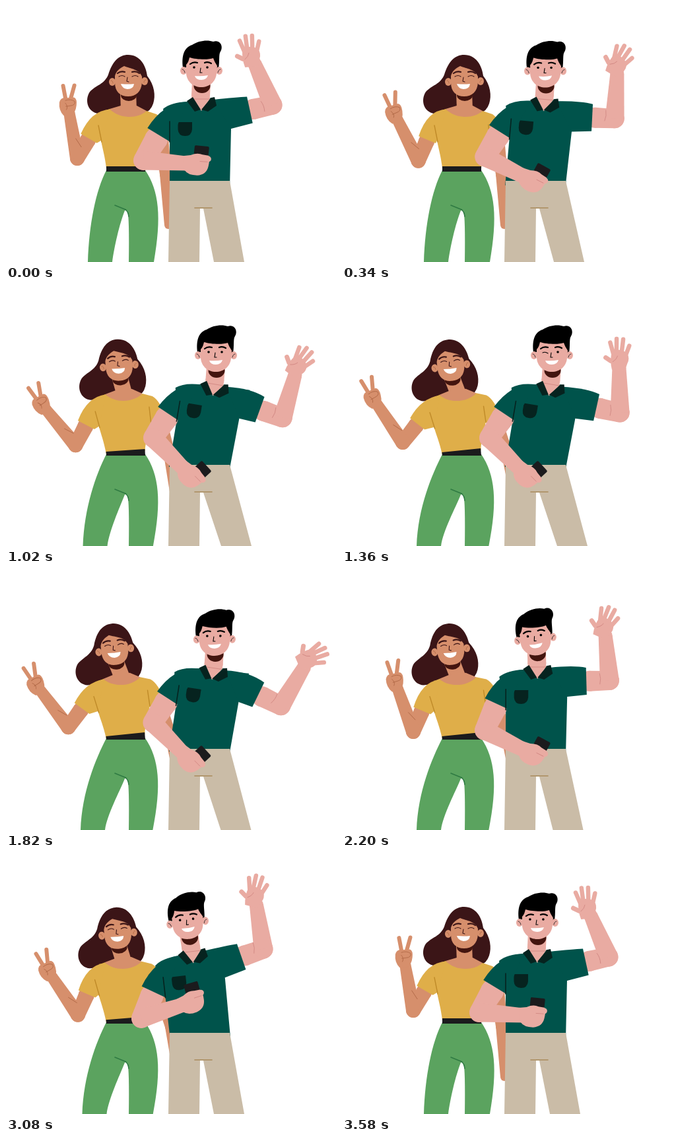
An HTML page with a canvas that plays this animation: 500 by 388 pixels, repeating every 3.6 s.

```html
<!DOCTYPE html>
<html lang="en">
<head>
<meta charset="utf-8">
<title>Waving couple</title>
<style>
html, body { margin: 0; width: 100%; height: 100%; overflow: hidden; background: #fff; }
canvas { display: block; }
</style>
</head>
<body>
<canvas id="stage" width="500" height="388"></canvas>
<script>
const ctx = document.getElementById('stage').getContext('2d');
const LOOP = 3600;

const C = {
  tan: '#d68f6c', tanLine: '#b26a48', brown: '#3b1517', yellow: '#dfae49', ochre: '#bf8a28',
  black: '#1b1b1d', leaf: '#5ba35f', leafLine: '#2f7a43',
  pink: '#e9aba2', pinkLine: '#cf8580', green: '#00534b', deep: '#06231f',
  sand: '#cabca7', sandLine: '#a98a5c', shade: '#43150f'
};

// Smooth step from 0 to 1 between two moments.
function ease(t, from, to) {
  const u = Math.min(1, Math.max(0, (t - from) / (to - from)));
  return u * u * (3 - 2 * u);
}

// Rises during one span, falls back during another.
const pulse = (t, a, b, c, d) => ease(t, a, b) - ease(t, c, d);

// Pendulum between turning points [time, angle], ending where it began.
function swing(t, ...turns) {
  const [[, first]] = turns;
  return [...turns, [LOOP, first]].reduce((sum, [time, angle], i, all) =>
    i ? sum + (angle - all[i - 1][1]) * ease(t, all[i - 1][0], time) : angle, 0);
}

// Angles are in degrees; a forearm at 0 points straight up.
function womanPose(t) {
  const sway = pulse(t, 400, 1400, 2850, 3600);
  const sag = pulse(t, 0, 700, 700, 1360) + pulse(t, 1700, 2200, 2900, 3600);
  const arm = swing(t, [0, -10], [700, -45], [1360, -34], [1680, -41], [2200, -20], [2820, -43]);
  return {
    head: [185 - 21 * sway, 112 + sway],
    lean: -6 * sway,
    leg: -11 * sway,
    elbow: [108 + 16 * (sag - sway), 231 + 8 * sag],
    arm, hand: 10 + 0.85 * arm
  };
}

function manPose(t) {
  const out = pulse(t, 0, 640, 1700, 2600);
  const back = pulse(t, 1700, 2600, 3080, 3600);
  const armOut = pulse(t, 0, 640, 1800, 2650);
  const lift = pulse(t, 2300, 3080, 3080, 3600);
  const arm = swing(t, [0, -23.5], [700, 32], [1360, -1], [1760, 32], [2580, -35], [3080, -9]);
  return {
    head: [296 + 22 * out - 21 * back, 97 + out],
    tilt: -6 * Math.min(1, 1.7 * back),
    lean: 9.5 * out - 6.5 * back,
    leg: 11 * out,
    elbow: [404 + armOut * (17 - 0.12 * arm) - 14 * back,
            150 + armOut * (36.5 + 0.45 * arm) - 12 * back],
    arm,
    hand: swing(t, [0, -6], [700, 70], [1360, 2], [1760, 68], [2580, -12], [3080, 14]),
    phoneElbow: [208 + 15 * out + 3 * back - 6 * lift, 234 - 10 * out + 12 * back - 3 * lift],
    phoneArm: 94 + 41.5 * armOut - 22 * lift,
    winking: t > 1160 && t < 1600
  };
}

const rad = deg => deg * Math.PI / 180;
const reach = ([x, y], deg, length) =>
  [x + length * Math.sin(rad(deg)), y - length * Math.cos(rad(deg))];
const middle = ([ax, ay], [bx, by]) => [(ax + bx) / 2, (ay + by) / 2];

function turner(px, py, deg) {
  const c = Math.cos(rad(deg)), s = Math.sin(rad(deg));
  return (x, y) => [px + (x - px) * c - (y - py) * s, py + (x - px) * s + (y - py) * c];
}

function within(x, y, deg, draw, ox = 0, oy = 0) {
  ctx.save();
  ctx.translate(x, y);
  ctx.rotate(rad(deg));
  ctx.translate(-ox, -oy);
  draw();
  ctx.restore();
}

function fill(color, path) {
  ctx.fillStyle = color;
  ctx.fill(new Path2D(path));
}

function stroke(color, width, path) {
  ctx.strokeStyle = color;
  ctx.lineWidth = width;
  ctx.lineCap = ctx.lineJoin = 'round';
  ctx.stroke(new Path2D(path));
}

function oval(color, x, y, rx, ry = rx) {
  ctx.fillStyle = color;
  ctx.beginPath();
  ctx.ellipse(x, y, rx, ry, 0, 0, 2 * Math.PI);
  ctx.fill();
}

// Tapered, round-ended limb.
function limb(color, [ax, ay], [bx, by], ra, rb) {
  const d = Math.hypot(bx - ax, by - ay), nx = (ay - by) / d, ny = (bx - ax) / d;
  oval(color, ax, ay, ra);
  oval(color, bx, by, rb);
  fill(color, `M${ax + nx * ra},${ay + ny * ra} L${bx + nx * rb},${by + ny * rb}
    L${bx - nx * rb},${by - ny * rb} L${ax - nx * ra},${ay - ny * ra}Z`);
}

// Sleeve from the collar over the shoulder to a hem square to the upper arm.
function sleeve(color, collar, bend, shoulder, elbow, length, half, pit) {
  const dx = elbow[0] - shoulder[0], dy = elbow[1] - shoulder[1], d = Math.hypot(dx, dy);
  const k = half / d * Math.sign(dx);
  const hx = shoulder[0] + dx * length / d, hy = shoulder[1] + dy * length / d;
  fill(color, `M${collar} Q${bend} ${hx + dy * k},${hy - dx * k}
    L${hx - dy * k},${hy + dx * k} L${pit}Z`);
}

function peaceHand() {
  stroke(C.tan, 6, 'M-3,-6 L-8,-29 M3,-6 L9,-30');
  fill(C.tan, 'M-13,-4 Q-11,-12 -3,-11 L9,-12 Q14,-10 13,0 Q12,13 4,16 L-6,16 Q-14,8 -13,-4Z');
  stroke(C.tanLine, 0.9, 'M-4,-7 Q4,-10 10,-6 Q12,0 3,1 L-3,2 M-4,-3 Q1,2 -2,7');
}

function openHand() {
  stroke(C.pink, 6.5, 'M-8,-2 L-14,-21 M-4,-8 L-4.5,-27 M4,-8 L5.5,-26.5 M10,-2 L15,-17');
  stroke(C.pink, 7, 'M0,9 L-12,7 L-20,2');
  fill(C.pink, 'M-11,-7 Q0,-14 12,-6 Q17,2 13,10 L10,20 L-10,20 Q-14,6 -11,-7Z');
  stroke(C.pinkLine, 0.8, 'M-9,8 Q-3,4 -2,-1');
}

function phoneHand() {
  within(6, -20, 2, () => fill(C.black, 'M-9,-8 H9 Q11,-8 11,-6 V9 H-11 V-6 Q-11,-8 -9,-8Z'));
  fill(C.pink, 'M-22,-11 L-10,-13 Q0,-18 8,-15 L17,-14 Q20,-8 18,2 Q16,15 2,17 Q-12,18 -18,10Z');
  stroke(C.pink, 9, 'M3,-9 L17,-9');
  stroke(C.pinkLine, 0.8, 'M5,-4.5 L16,-4.5');
}

function womanHead() {
  oval(C.shade, 1, 23, 12, 9);
  oval(C.tan, -24, 3, 5, 6);
  oval(C.tan, 25, 2, 5, 6);
  fill(C.tan, `M-20,-6 C-18,-14 -12,-18 -6,-21 C4,-17 17,-16 21,-5 L21,4
    C20,18 12,25 0,25 C-12,25 -20,18 -20,4Z`);
  stroke(C.tanLine, 0.9, 'M-26,1 Q-23,1 -23,5 M27,0 Q24,0 24,4');
  stroke(C.brown, 2.2, 'M-16,-10 Q-11,-14 -5,-12 M6,-12 Q12,-14 17,-10');
  stroke(C.brown, 1.1, 'M-14,-5 Q-9,-8 -5,-5 M6,-5 Q11,-8 15,-5 M-1,-4 L-2,2 L1,3');
  fill('#fff', 'M-11,6 Q0,7 9,6 Q8,14 -1,14 Q-9,13 -11,6Z');
}

function manHead(winking) {
  oval(C.shade, 1, 24, 12.5, 11);
  fill('#000', `M-28,-4 C-30,-20 -27,-34 -14,-38 C-4,-45 10,-46 18,-43
    C28,-47 34,-36 29,-28 C26,-24 28,-14 26,-2Z`);
  oval(C.pink, -27, 1, 5, 6);
  oval(C.pink, 27, 1, 5, 6);
  fill(C.pink, `M-23,-8 C-20,-11 -19,-15 -18,-19 C-8,-16 10,-15 18,-18 C20,-12 22,-10 24,-6
    L23,5 C22,18 12,26 0,26 C-12,26 -22,18 -23,5Z`);
  stroke(C.black, 0.8, 'M-29,-1 Q-26,-1 -25,4 M29,-1 Q26,-1 25,4');
  stroke('#000', 2.2, 'M-17,-9 Q-12,-13 -6,-11 M5,-11 Q10,-13 15,-10');
  if (winking) stroke('#000', 1.1, 'M-14,-3 Q-10,-5 -6,-2');
  else oval('#000', -11, -4, 1.8);
  oval('#000', 9, -4, 1.8);
  stroke('#000', 1.1, 'M-1,-3 L-2,4 L1,4');
  fill('#fff', 'M-10,9 Q0,10 10,8 Q8,15 0,15 Q-8,15 -10,9Z');
}

function drawWoman({ head, lean, leg, elbow, arm, hand }) {
  const torso = turner(181, 250, lean);
  const onTorso = draw => within(181, 250, lean, draw, 181, 250);
  const shoulder = torso(141, 174);

  within(...head, lean, () => fill(C.brown, `M0,-38 C18,-38 27,-22 29,-6
    C40,8 42,24 38,36 Q34,48 24,50 L-46,51 C-62,48 -66,30 -58,18
    C-49,8 -36,7 -30,-8 C-24,-28 -14,-38 0,-38Z`));

  const farElbow = [242 - lean * 1.7, 255];
  limb(C.tan, torso(234, 190), farElbow, 11, 9);
  limb(C.tan, farElbow, [246 - lean * 2.7, 332 + lean * 2], 9, 6);

  limb(C.tan, middle(shoulder, elbow), elbow, 12, 11);
  limb(C.tan, elbow, reach(elbow, arm, 70), 11, 8.5);
  within(...reach(elbow, arm, 82), hand, peaceHand);
  within(...elbow, arm, () => stroke(C.tanLine, 0.9, 'M9,-16 L3,-30'));

  limb(C.tan, reach(head, lean, -18), torso(186, 158), 12, 12);
  onTorso(() => {
    fill(C.yellow, `M157,156 Q185,176 213,159 L228,164 Q240,172 246,200 L222,206
      C220,220 212,232 211,246 L152,246 C150,228 146,215 144,204 L136,180 L140,162Z`);
    fill(C.tan, 'M157,156 L174,151 H198 L213,159 C200,171 172,172 157,156Z');
  });
  sleeve(C.yellow, torso(158, 156.5), torso(129, 158), shoulder, elbow, 31, 14, torso(144, 204));

  fill(C.leaf, `M152,249 C136,280 ${126 + leg},330 ${124 + leg},388 H${161 + leg}
    C${164 + leg},365 172,330 180,310 L184,310 Q187,320 186,388 H${224 + leg * 0.15}
    C236,320 232,280 211,249Z`);
  stroke(C.leafLine, 1.6, 'M165,302 L181,308.5 Q185,311 186,319');
  fill(C.black, `M${torso(152, 243)} L${torso(211, 243)} L211,251 H152Z`);
  onTorso(() => stroke(C.ochre, 1.4, 'M140,181 L145,206 M222,180 L223,204'));
  within(...head, lean, womanHead);
}

function drawMan({ head, tilt, lean, leg, elbow, arm, hand, phoneElbow, phoneArm, winking }) {
  const torso = turner(295, 265, lean);
  const onTorso = draw => within(295, 265, lean, draw, 295, 265);
  const shoulder = torso(344, 163), phoneShoulder = torso(248, 168);

  limb(C.pink, middle(shoulder, elbow), elbow, 15.5, 14.5);
  limb(C.pink, elbow, reach(elbow, arm, 68), 14.5, 10.5);
  within(...reach(elbow, arm, 85), hand, openHand);
  within(...elbow, arm, () => stroke(C.pinkLine, 0.8, 'M-14,-12 Q-12,-4 -15,4'));

  onTorso(() => fill(C.green, `M283,140 L275,145 Q250,146 238,156 L248,206
    V276 H339 L341,186 L350,141 L313,143 L311,139Z`));
  sleeve(C.green, torso(314, 142), torso(350, 138), shoulder, elbow, 26, 20.5, torso(341, 186));

  fill(C.sand, `M248,265 H339 L${361 + leg},388 H${315 + leg} L299,307 H294 L293,388 H246Z`);
  stroke(C.sandLine, 1.6, 'M286,306 H312');

  onTorso(() => fill(C.pink, 'M281,139 H310 L296,159Z'));
  limb(C.pink, reach(head, tilt, -18), torso(295, 136), 14, 14);
  onTorso(() => {
    stroke(C.pinkLine, 0.8, 'M284,141 H308');
    fill(C.deep, 'M274,144 L283,138 L295,157 L286,160Z M311,139 L316,138 L319,151 L306,160 L296,157Z');
    fill(C.deep, 'M260.5,176 H282 V187 Q281,197 271.5,197 Q261,197 260.5,187Z');
  });
  within(...head, tilt, () => manHead(winking));

  limb(C.pink, middle(phoneShoulder, phoneElbow), phoneElbow, 17.5, 15);
  limb(C.pink, phoneElbow, reach(phoneElbow, phoneArm, 66), 14.5, 11);
  within(...reach(phoneElbow, phoneArm, 81), phoneArm - 90, phoneHand);
  sleeve(C.green, torso(275, 145), torso(238, 147), phoneShoulder, phoneElbow, 32, 20, torso(249, 206));
  onTorso(() => stroke(C.deep, 1.6, 'M248,175 V206'));
}

function render(now) {
  const t = now % LOOP;
  ctx.fillStyle = '#fff';
  ctx.fillRect(0, 0, 500, 388);
  drawWoman(womanPose(t));
  drawMan(manPose(t));
  requestAnimationFrame(render);
}
requestAnimationFrame(render);
</script>
</body>
</html>
```
